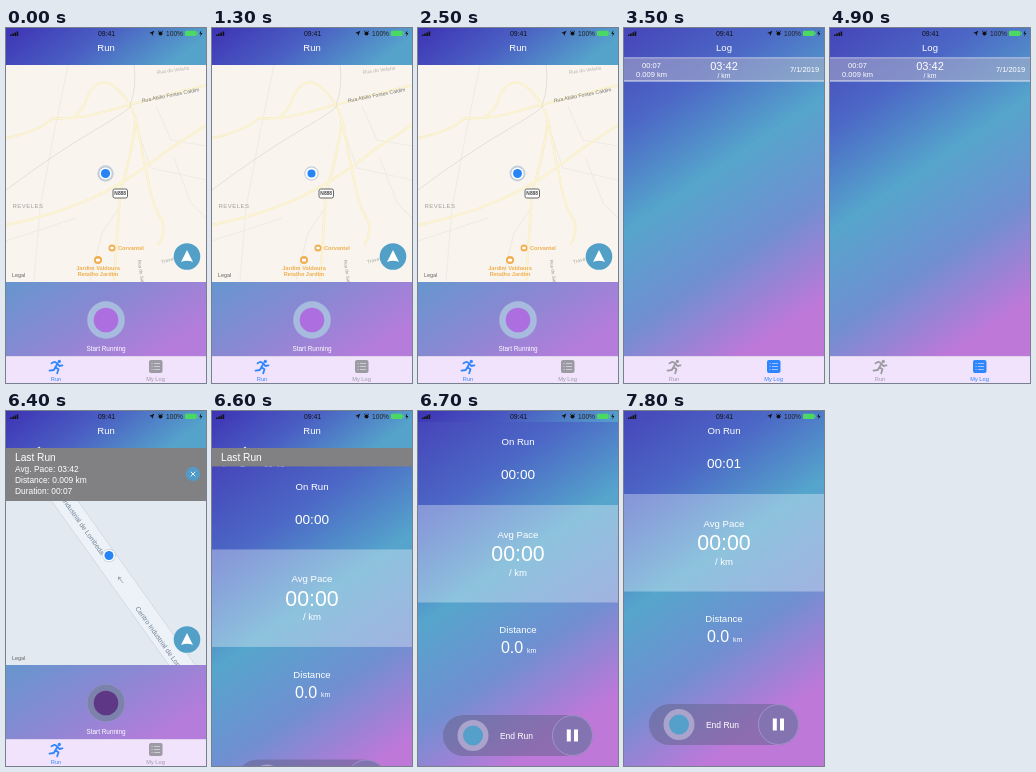
An HTML page that plays this animation: 200x355 px, repeating every 8 s.

```html
<!DOCTYPE html>
<html lang="en">
<head>
<meta charset="utf-8">
<title>Running tracker</title>
<style>
  html, body { margin: 0; width: 100%; height: 100%; overflow: hidden; }
  svg { display: block; width: 100vw; height: 100vh; }
  text { font-family: "Liberation Sans", Arial, sans-serif; }
</style>
</head>
<body>
<svg id="stage" viewBox="0 0 200 355"></svg>
<script>
const LOOP = 8000, BLUE = '#2e86ff', GRAY = '#9c9aa2';

// Shape helpers; text is centred vertically on y.
const text = (x, y, s, size, fill = '#fff', more = '') =>
  `<text x="${x}" y="${y + size * .36}" font-size="${size}" fill="${fill}" text-anchor="middle" ${more}>${s}</text>`;
const left = (x, y, s, size, fill, more = '') =>
  text(x, y, s, size, fill, more).replace('middle', 'start');
const rect = (x, y, w, h, fill, more = '') =>
  `<rect x="${x}" y="${y}" width="${w}" height="${h}" fill="${fill}" ${more}/>`;
const circle = (x, y, r, fill, more = '') =>
  `<circle cx="${x}" cy="${y}" r="${r}" fill="${fill}" ${more}/>`;
const line = (d, stroke, w = 1, more = '') =>
  `<path d="${d}" fill="none" stroke="${stroke}" stroke-width="${w}" ${more}/>`;
const group = (id, body, more = '') => `<g id="${id}" ${more}>${body}</g>`;
const turn = (a, x, y) => `transform="rotate(${a} ${x} ${y})"`;
const gradient = (id, x2, y2, ...colors) =>
  `<linearGradient id="${id}" x2="${x2}" y2="${y2}">${colors.map((c, i) =>
    `<stop offset="${i / (colors.length - 1)}" stop-color="${c}"/>`).join('')}</linearGradient>`;

function tabs(log) {
  const run = log ? GRAY : BLUE, list = log ? BLUE : GRAY;
  const rows = [335.5, 338.5, 341.5].map(y =>
    line(`M145.5 ${y}h1.2M148 ${y}h6`, '#f4eafa', .6)).join('');
  return rect(0, 328, 200, 27, '#f0e3fb') + rect(0, 328, 200, .5, '#cfc3de') +
    circle(53.3, 333.4, 1.6, run) +
    line('M45.5 335.3L48.5 333.8L51.5 335.5L49.4 339.2L52.5 341.3L51.2 345.3M49.4 339.2L47.8 342L43.5 342.6M51.5 335.5L53.3 338L56.5 337.3',
      run, 1.8, 'stroke-linecap="round" stroke-linejoin="round"') +
    rect(143, 332, 13.5, 13, list, 'rx="2"') + rows +
    text(50, 351, 'Run', 5.7, run) + text(149.5, 351, 'My Log', 5.7, list);
}

function townMap() {
  const minor = 'M62 37L48 105L34 180L28 253M0 213L70 190M128 92L145 140L200 152M150 78L165 112L200 118' +
    'M84 253L96 205L113 180M168 130L185 175L200 190';
  const major = 'M0 110Q32 104 47 90Q70 92 97 84T200 57M65 90Q76 86 82 67Q94 46 110 60Q124 72 130 92L142 152' +
    'Q147 180 156 192Q160 206 152 217M0 197Q45 188 82 172T162 122L200 97M130 92Q126 125 114 165L108 253';
  const poi = '#efae4f', bold = 'font-weight="bold"';
  return rect(0, 37, 200, 217, '#f9f5ee') +
    line(minor, '#efece5', 1.2) +
    line(major, '#f1e8c4', 2.3) + line(major, '#fcf4d3', 1.6) +
    line('M0 162Q48 126 89 102T124 77Q131 60 128 37', '#dad7d1', .7) +
    text(167, 42, 'Rua do Velario', 5, '#b5b2ad', turn(-8, 167, 42)) +
    text(164.5, 67, 'Rua Abílio Fontes Caldim', 5.2, '#777', turn(-11, 164.5, 67)) +
    text(135, 243, 'Rua do Sal', 4.6, '#9a9893', turn(82, 135, 243)) +
    text(22, 178, 'REVELES', 6, '#a09d98', 'letter-spacing=".5"') +
    rect(107, 161, 14.5, 9, '#fff', 'rx="1.8" stroke="#555" stroke-width=".9"') +
    text(114.2, 165.6, 'N888', 4.9, '#444', bold) +
    circle(106, 220, 3.5, poi) + rect(104.3, 218.8, 3.4, 2.4, '#fff', 'rx=".6"') +
    left(112, 220, 'Corvantel', 5.6, poi, bold) +
    circle(92, 232, 4, poi) + rect(90, 230.8, 4, 2.7, '#fff', 'rx=".6"') +
    text(92, 240, 'Jardim Valdoura', 5.6, poi, bold) + text(92, 246, 'Retalho Jardim', 5.6, poi, bold) +
    left(155, 234, 'Travessa', 5, '#aaa8a3', turn(-15, 155, 234));
}

// A coarse disc, smoothed as when a small raster is scaled up.
function blob() {
  let cells = '';
  const step = 8;
  for (let x = 43.5; x < 155; x += step)
    for (let y = 88.5; y < 200; y += step)
      if (Math.hypot(x + 4 - 99.5, y + 4 - 144.5) < 49) cells += rect(x, y, step, step, '#602df7');
  return group('blob', cells, 'filter="url(#soft)" shape-rendering="crispEdges"');
}

function roadMap() {
  const name = 'Centro Industrial de Lombeda', road = 'M24.5 42L184.5 266';
  return rect(0, 37, 200, 217, '#e2e9f1') +
    line(road, '#ccd7e2', 22) + line(road, '#ecf2f8', 21) +
    text(97, 143, name, 6.8, '#718193', turn(54.5, 97, 143)).replace('middle', 'end') +
    left(131, 196, name, 6.8, '#718193', turn(54.5, 131, 196)) +
    line('M117 172L112.5 166M112.5 169L112.5 166L115.3 167', '#8b99a8', .8) +
    blob() +
    rect(0, 37, 200, 53, '#757576', 'opacity=".89"') +
    left(9, 46.5, 'Last Run', 10.2) +
    ['Avg. Pace: 03:42', 'Distance: 0.009 km', 'Duration: 00:07'].map((s, i) =>
      left(9, 57.5 + i * 11, s, 8.4)).join('') +
    circle(187, 63, 7.2, '#529bc9') + line('M184.7 60.7l4.6 4.6m0 -4.6l-4.6 4.6', '#fff', .9);
}

const button = (ring, core) => circle(100, 292, 18.8, ring) + circle(100, 292, 12.3, core);

const runScreen = group('run',
  rect(0, 0, 200, 37, 'url(#head)') +
  group('town', townMap()) + group('road', roadMap()) +
  group('dot', circle(0, 0, 8, '#c3ceda', 'id="halo"') + circle(0, 0, 6.1, '#fff') + circle(0, 0, 4.4, '#2684f7', 'id="core"')) +
  text(100, 20, 'Run', 9.5) +
  left(6, 247, 'Legal', 5.4, '#666') +
  circle(181, 228.5, 13.3, '#529fc7') +
  '<path d="M181 222L187 234Q181 231.5 175 234Z" fill="#fff"/>' +
  rect(0, 254, 200, 75, 'url(#foot)') +
  button('#a6bbdd', '#ad6ee0') + group('press', button('#7d82ac', '#5e3786')) +
  text(100, 320.5, 'Start Running', 6.4) + tabs(false));

const logScreen = group('log',
  rect(0, 0, 200, 355, 'url(#sky)') + text(100, 20, 'Log', 9.5) +
  rect(0, 30, 200, 23, '#b9b7cc', 'opacity=".5"') +
  rect(0, 29.5, 200, .7, '#dfe2f5') + rect(0, 52.5, 200, 1, '#e6eaf5') +
  text(27.5, 37.5, '00:07', 7.5) + text(27.5, 46, '0.009 km', 7.5) +
  text(100, 38, '03:42', 11) + text(100, 48, '/ km', 6.9) +
  text(180.5, 41.5, '7/1/2019', 7.5) + tabs(true));

const activeScreen = group('active',
  rect(0, 0, 200, 355, 'url(#sky)') +
  rect(0, 83, 200, 97.5, '#fff', 'opacity=".33"') +
  text(100, 20, 'On Run', 9.6) + text(100, 52.5, '00:00', 13.6, '#fff', 'id="clock"') +
  text(100, 112.5, 'Avg Pace', 9.6) + text(100, 131.5, '00:00', 21.3) + text(100, 150.5, '/ km', 9.6) +
  text(100, 208, 'Distance', 9.6) + text(94, 225.5, '0.0', 16) + text(113.7, 228.3, 'km', 6.9) +
  rect(25, 293, 150, 41, '#66648f', 'rx="20.5" opacity=".55"') +
  circle(55, 313.5, 15.5, '#aaa4cd') + circle(55, 313.5, 10, '#559fcb') +
  text(98.5, 313.5, 'End Run', 8.5) +
  circle(154.5, 313.5, 20, '#8077b3', 'fill-opacity=".65" stroke="#a69bd0" stroke-width=".8"') +
  rect(148.8, 307.5, 4, 12, '#fff') + rect(156, 307.5, 4, 12, '#fff'));

const statusBar = [0, 1, 2, 3].map(i => rect(4 + i * 2.2, 6.5 - i, 1.6, 1.5 + i, '#111')).join('') +
  text(100.5, 5.3, '09:41', 6.9, '#111') +
  '<path d="M148.3 2.8L146.2 8L145.6 5.6L143.2 5Z" fill="#111"/>' +
  circle(154.5, 5.5, 2, '#111') +
  line('M152 3.8l1.3 -1.2M157 3.8l-1.3 -1.2', '#111', .7) +
  text(168.5, 5.3, '100%', 6.6, '#222') +
  rect(179, 2.8, 11.5, 5.2, '#4bd964', 'rx="1.2"') + rect(191, 4.3, .9, 2.2, '#4bd964') +
  '<path d="M195.3 2.3L193.3 5.8H194.8L194.2 8.5L196.4 4.9H194.9Z" fill="#111"/>';

stage.innerHTML = '<defs>' +
  gradient('sky', .38, 1, '#4645b9', '#4c68c6', '#55a5cc', '#708fd1', '#bd78d8') +
  gradient('head', 1, .25, '#3e33b4', '#4a5fc3', '#55a2cb') +
  gradient('foot', 1, .6, '#6696ce', '#8a88d3', '#b67cdb') +
  '<filter id="soft"><feGaussianBlur stdDeviation="2.6"/></filter></defs>' +
  runScreen + logScreen + activeScreen + statusBar;

const $ = id => document.getElementById(id);
const show = (id, on) => $(id).setAttribute('display', on ? 'inline' : 'none');

function draw(t) {
  const onLog = t >= 2600 && t < 5000, hasRun = t >= 5000;
  show('run', !onLog);
  show('log', onLog);
  show('town', !hasRun);
  show('road', hasRun);
  show('press', t >= 6300 && t < 6600);
  $('blob').setAttribute('opacity', Math.max(0, Math.min(1, (5700 - t) / 250)));

  const pulse = Math.cos(t / 1500 * Math.PI);
  $('dot').setAttribute('transform', hasRun ? 'translate(103 144.5)' : 'translate(99.5 145.5)');
  $('core').setAttribute('r', 4.3 + .3 * pulse);
  $('halo').setAttribute('r', hasRun ? 6.7 : 7.7 + .5 * pulse);

  // The run sheet rises as a critically damped spring.
  const k = Math.max(0, t - 6435) / 50;
  show('active', k > 0);
  $('active').setAttribute('transform', `translate(0 ${355 * (1 + k) * Math.exp(-k)})`);
  $('clock').textContent = t < 7400 ? '00:00' : '00:01';
}

(function tick() {
  draw(performance.now() % LOOP);
  requestAnimationFrame(tick);
})();
</script>
</body>
</html>
```
